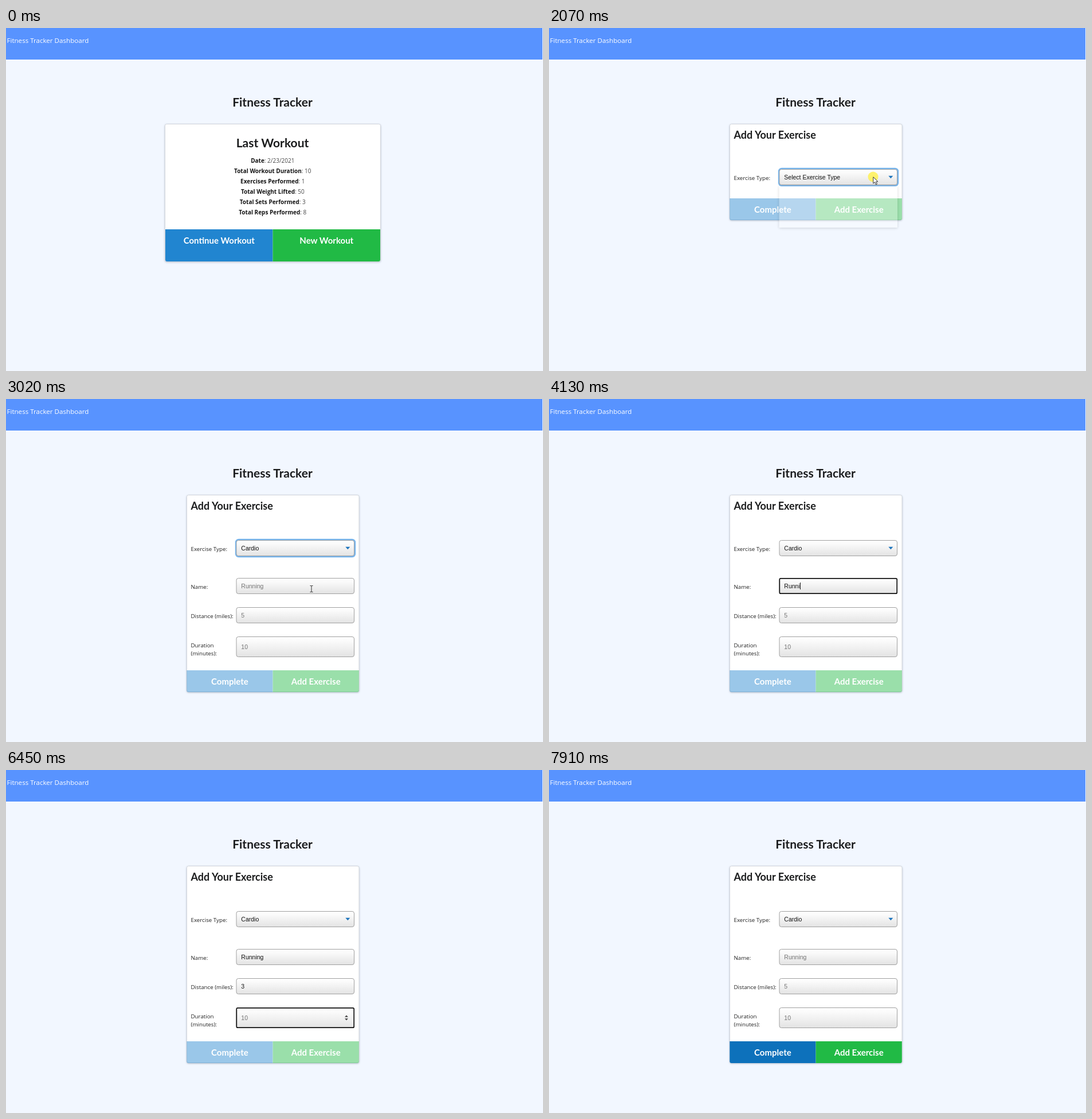
Write an HTML page that moves like this. It is 937x598 px and loops after 7.99 s.

```html
<!DOCTYPE html>
<html lang="en">
<head>
<meta charset="utf-8">
<title>Fitness Tracker</title>
<style>
  html, body { margin: 0; width: 100%; height: 100%; overflow: hidden; background: #f2f7ff; }
  svg { display: block; width: 937px; height: 598px; }
  text { white-space: pre; }
  .nav { font: 11.6px "Open Sans", sans-serif; fill: #fff; }
  .h1 { font: 700 21px Lato, sans-serif; fill: #1b1c1d; text-anchor: middle; }
  .h2 { font: 700 18px Lato, sans-serif; fill: #1b1c1d; }
  .btn { font: 700 15px Lato, sans-serif; fill: #fff; text-anchor: middle; }
  .stat { font: 10px "Open Sans", sans-serif; fill: #484848; text-anchor: middle; }
  .stat .b { font-weight: 700; fill: #151515; }
  .label { font: 9.75px "Open Sans", sans-serif; fill: #212121; }
  .field { font: 10.5px "Liberation Sans", Arial, sans-serif; fill: #111; }
  .field.hint { fill: #757575; }
  .card { fill: #fff; stroke: #d3d7dd; filter: drop-shadow(0 1px 1.5px rgba(60, 70, 90, .32)); }
  .menu { fill: #fff; filter: drop-shadow(0 1px 2.5px rgba(0, 0, 0, .55)); }
  .box { fill: url(#shade); stroke: #a0a0a0; }
</style>
</head>
<body>
<svg id="stage" viewBox="0 0 937 598" xmlns="http://www.w3.org/2000/svg"></svg>
<script>
const LOOP = 7990;
const BLUE = [33, 133, 208], DARK = [13, 113, 187], GREEN = '#21ba45';

const text = (cls, x, y, s, id = '') => `<text class="${cls}" x="${x}" y="${y}" id="${id}">${s}</text>`;
const rect = (x, y, w, h, attrs) => `<rect x="${x}" y="${y}" width="${w}" height="${h}" ${attrs}/>`;
// pair of buttons sharing the rounded bottom of a card
const buttons = (x, w, h, id, left, right, base) => {
  const m = w / 2, r = 3;
  return `<path id="${id}" d="M${x} 0h${m}v${h}h${r - m}q${-r} 0 ${-r} ${-r}z"/>
    <path fill="${GREEN}" d="M${x + m} 0h${m}v${h - r}q0 ${r} ${-r} ${r}h${r - m}z"/>` +
    text('btn', x + m / 2, base, left) + text('btn', x + m * 1.5, base, right);
};
const input = (id, y, h, spin) =>
  rect(402, y + .5, 205.5, h - 1, `class="box" rx="3.5" id="${id}Box"`) +
  `<g id="${id}Focus">${rect(402.3, y + .8, 204.9, h - 1.6, 'fill="none" stroke="#111" stroke-width="1.7" rx="2"')}
    ${spin ? `<path fill="#444" d="M591 ${y + h / 2 - 1.3}l3-3.2 3 3.2zM591 ${y + h / 2 + 1.3}l3 3.2 3-3.2z"/>` : ''}</g>` +
  text('field', 410.3, y + h / 2 + 4, '', id) +
  rect(410, y + h / 2 - 6, 1, 12, `fill="#111" id="${id}Caret"`);

const stats = [['Date', '2/23/2021'], ['Total Workout Duration', 10], ['Exercises Performed', 1],
  ['Total Weight Lifted', 50], ['Total Sets Performed', 3], ['Total Reps Performed', 8]];
const options = ['Select Exercise Type', 'Resistance', 'Cardio'];
const ROW = 71 / 3;

document.getElementById('stage').innerHTML = `
  <defs><linearGradient id="shade" x2="0" y2="1">
    <stop stop-color="#fff"/><stop offset=".2" stop-color="#fbfbfb"/><stop offset="1" stop-color="#e3e3e3"/>
  </linearGradient></defs>
  ${rect(0, 0, 937, 598, 'fill="#f2f7ff"')}
  ${rect(0, 0, 936, 55, 'fill="#5893ff"')}
  ${text('nav', 1.5, 26, 'Fitness Tracker Dashboard')}
  ${text('h1', 465, 136.5, 'Fitness Tracker')}
  <g id="home">
    ${rect(277.5, 167.5, 376, 239.5, 'class="card" rx="3"')}
    ${text('h1', 465, 208, 'Last Workout')}
    ${stats.map(([k, v], i) => text('stat', 465.3, 235 + 18 * i, `<tspan class="b">${k}</tspan>: ${v}`)).join('')}
    <g transform="translate(0 351)">${buttons(278, 375, 56, 'resume', 'Continue Workout', 'New Workout', 25.3)}</g>
  </g>
  <g id="entry">
    ${rect(315.5, 167.5, 300.5, 167, 'class="card" rx="3" id="panel"')}
    ${text('h2', 322.5, 192.7, 'Add Your Exercise')}
    ${text('label', 322.5, 264.5, 'Exercise Type:')}
    ${rect(401.5, 245.5, 207, 29, 'fill="none" stroke="#78b6ee" stroke-width="3.4" rx="4.5" id="ring"')}
    ${rect(402, 246.5, 205.5, 27, 'class="box" rx="3.5"')}
    ${text('field', 410.3, 264, '', 'kind')}
    <path fill="#1c74bd" d="M592.3 257.8h8l-4 4.5z"/>
    <g id="form">
      ${text('label', 322.5, 330.5, 'Name:')}
      ${text('label', 322.5, 381.5, 'Distance (miles):')}
      ${text('label', 322.5, 432.7, 'Duration')}${text('label', 322.5, 447, '(minutes):')}
      ${input('name', 312, 28)}${input('miles', 363, 28, true)}${input('mins', 414, 36, true)}
    </g>
    <g id="actions">${buttons(315.3, 300.5, 38, 'done', 'Complete', 'Add Exercise', 25.3)}</g>
    <g id="popup">
      ${rect(401.5, 275.5, 206.5, 72.5, 'class="menu"')}
      ${rect(402, 0, 205.5, ROW, 'fill="#1967d2" id="hover"')}
      ${options.map((s, i) => text(i ? 'field' : 'field hint', 410.3, 276 + ROW * i + 15.5, s, 'opt' + i)).join('')}
    </g>
  </g>
  <circle id="click" cx="565.5" cy="259.5" r="9" fill="#fff04a" fill-opacity=".8"/>
  <path id="arrow" d="M.3.3v11.2l2.7-2.4 1.9 4.3 2-.9-1.9-4.1h3.5z" fill="#fff" stroke="#222" stroke-width=".9"/>
  <path id="beam" d="M530.5 325.5h1.7l.8.6.8-.6h1.7M533 326v10M530.5 336.5h1.7l.8-.6.8.6h1.7" fill="none" stroke="#333"/>`;

const el = {};
document.querySelectorAll('[id]').forEach(n => { if (n.id) el[n.id] = n; });

const show = (id, on) => el[id].style.display = on ? '' : 'none';
const put = (id, s) => { if (el[id].textContent !== s) el[id].textContent = s; };
const within = (t, a, b) => t >= a && t < b;
const count = (t, times) => times.filter(x => t >= x).length;
const mix = p => `rgb(${BLUE.map((c, i) => Math.round(c + (DARK[i] - c) * p))})`;

function setInput(id, value, hint, focus, caret) {
  put(id, value || hint);
  el[id].classList.toggle('hint', !value);
  show(id + 'Focus', focus);
  show(id + 'Caret', focus && caret);
  if (focus) {
    const w = value ? el[id].getComputedTextLength() : 0;
    el[id + 'Caret'].setAttribute('x', Math.round(410.2 + w));
  }
}

function draw(t) {
  const home = t < 1430, open = t >= 2930, sent = t >= 7910;
  show('home', home);
  show('entry', !home);
  el.resume.setAttribute('fill', mix(count(t, [870, 950, 1030, 1110, 1190]) / 5));

  // exercise card
  el.panel.setAttribute('height', open ? 343 : 167);
  el.actions.setAttribute('transform', `translate(0 ${open ? 473 : 297})`);
  el.actions.setAttribute('opacity', [.45, .75, .98, 1][count(t, [6600, 6680, 6760])]);
  el.done.setAttribute('fill', mix(count(t, [7140, 7220]) / 2));
  show('ring', within(t, 1990, 3200));
  put('kind', options[open ? 2 : 0]);
  show('form', open);

  // drop-down list
  show('popup', within(t, 2070, 2930));
  el.popup.setAttribute('opacity', [.28, .75, 1][count(t, [2140, 2220])]);
  const pick = count(t, [2540, 2690]);
  show('hover', pick > 0);
  el.hover.setAttribute('y', 276 + ROW * pick);
  options.forEach((_, i) => {
    show('opt' + i, t >= 2140);
    el['opt' + i].style.fill = i && i === pick ? '#fff' : '';
  });

  // pointer
  const p = count(t, [2460, 2540, 2620, 2690, 2770]) / 5;
  show('click', within(t, 1990, 2220));
  show('arrow', within(t, 1990, 3020));
  el.arrow.setAttribute('transform', `translate(${565.5 - 25 * p} ${259.5 + 71 * p})`);
  show('beam', within(t, 3020, 3430));

  // typing
  const keys = count(t, [3430, 3660, 3830, 3980, 4130, 4210, 4360]);
  setInput('name', sent ? '' : 'Running'.slice(0, keys), 'Running', within(t, 3200, 4910), true);
  setInput('miles', !sent && t >= 5520 ? '3' : '', '5', within(t, 4910, 5900), t >= 5060);
  setInput('mins', sent ? '' : '30'.slice(0, count(t, [6600, 6840])), '10',
    within(t, 5900, 7140), !within(t, 6450, 6600));
}

const start = performance.now();
function tick() {
  draw((performance.now() - start) % LOOP);
  requestAnimationFrame(tick);
}
tick();
</script>
</body>
</html>
```
